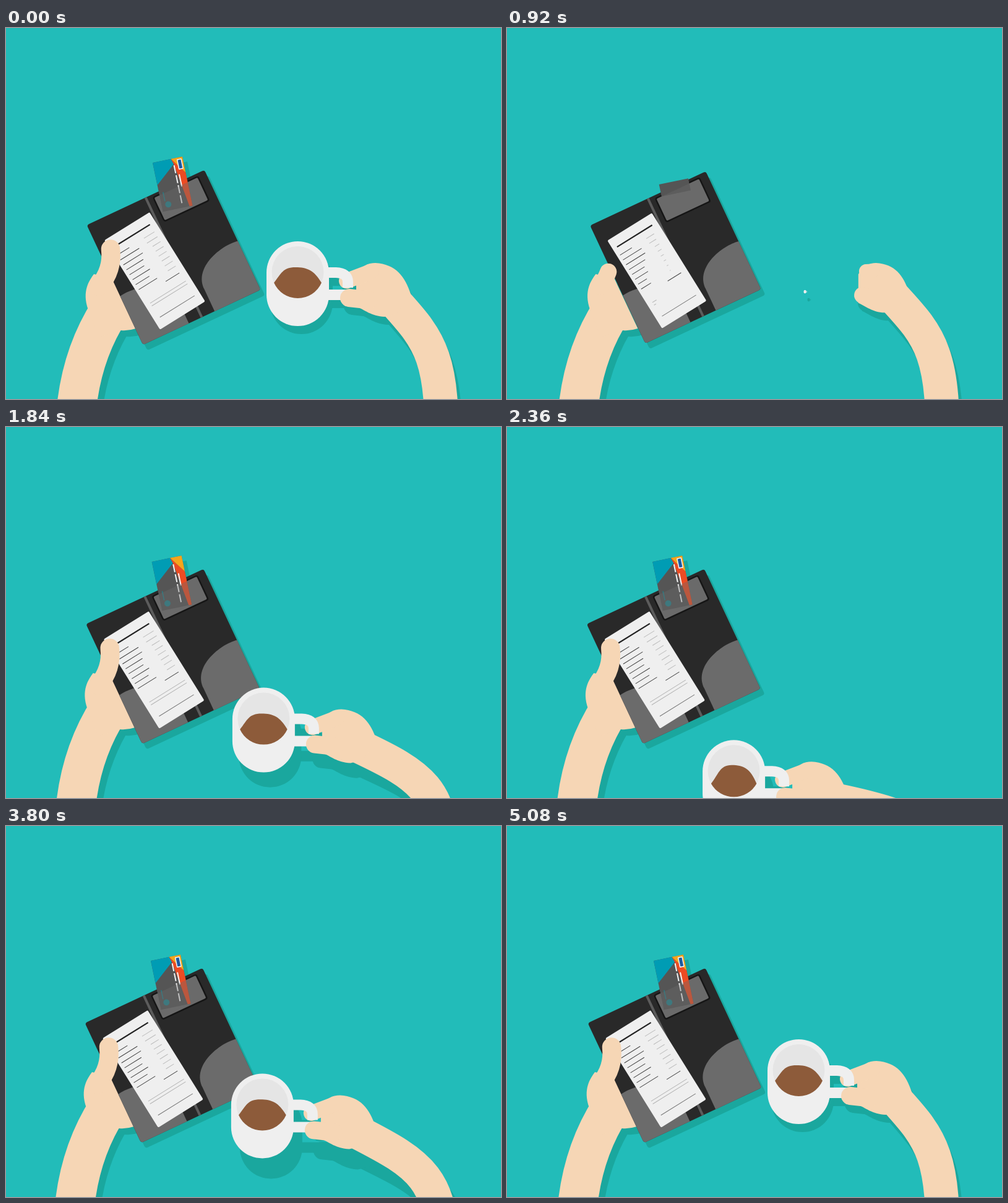
Write an HTML page with a canvas that moves like this. It is 800 by 600 pixels and loops after 5.12 s.

```html
<!DOCTYPE html>
<html lang="en">
<head>
<meta charset="utf-8">
<title>Paying the bill</title>
<style>
html, body { margin: 0; width: 100%; height: 100%; overflow: hidden; background: #22bcb9; }
canvas { display: block; }
</style>
</head>
<body>
<canvas id="stage" width="800" height="600"></canvas>
<script>
const ctx = document.getElementById('stage').getContext('2d');
const LOOP = 5120;
const TEAL = '#22bcb9', SHADOW = '#1aa79e', SKIN = '#f6d6b5', CHINA = '#efefef';
const DARK = '#292929', GREY = '#6b6b6b';
let tint = null; // when set, every shape takes this colour

const clamp = x => Math.min(1, Math.max(0, x));
const lerp = (a, b, k) => a + (b - a) * k;
const span = (t, from, to) => clamp((t - from) / (to - from));
const ease = (t, from, to) => (1 - Math.cos(Math.PI * span(t, from, to))) / 2;
const easeOut = (t, from, to) => 1 - (1 - span(t, from, to)) ** 3;

function fill(path, color) {
  ctx.fillStyle = tint || color;
  ctx.fill(new Path2D(path));
}
function stroke(path, color, width, cap = 'butt') {
  ctx.strokeStyle = tint || color;
  ctx.lineWidth = width;
  ctx.lineCap = cap;
  ctx.stroke(new Path2D(path));
}
function box(x, y, w, h, r, color) {
  ctx.fillStyle = tint || color;
  ctx.beginPath();
  ctx.roundRect(x, y, w, h, r);
  ctx.fill();
}
function disc(x, y, r, color) {
  ctx.fillStyle = tint || color;
  ctx.beginPath();
  ctx.arc(x, y, r, 0, 2 * Math.PI);
  ctx.fill();
}
function group(x, y, degrees, draw) {
  ctx.save();
  ctx.translate(x, y);
  ctx.rotate(degrees * Math.PI / 180);
  draw();
  ctx.restore();
}
function scaled(x, y, sx, sy, draw) {
  if (!sx || !sy) return;
  ctx.save();
  ctx.translate(x, y);
  ctx.scale(sx, sy);
  ctx.translate(-x, -y);
  draw();
  ctx.restore();
}
function shadow(dx, dy, draw) {
  tint = SHADOW;
  group(dx, dy, 0, draw);
  tint = null;
}

function walletCover() {
  group(271, 371, -25.1, () => {
    box(-105, -107, 210, 214, 4, DARK);
    if (tint) return;
    const panel = () => fill('M105,20C78,15 22,28 23,68V107H101Q105,107 105,103Z', GREY);
    panel();
    scaled(0, 0, -1, 1, panel);
    box(-2, -107, 4, 214, 0, '#5c5c5c');
    box(10, -103, 82, 45, 4, '#151515');
    box(12.5, -100.5, 77, 40, 2, GREY);
  });
}

function card(t) {
  const grow = 1.1 * ease(t, 820, 1140) - .1 * ease(t, 1140, 1360);
  group(237, 218, -11.8, () => scaled(24, 45, 1, grow, () => {
    box(0, 0, 49, 81, 0, '#555');
    if (tint) return;
    ctx.globalAlpha = ease(t, 1000, 1160);
    fill('M0,0H30L33,9L0,37Z', '#009cb4');
    fill('M30,0L49,26V81H44L33,9Z', '#ec4b23');
    fill('M30,0H49V26Z', '#f6a51c');
    for (let y = 11; y < 70; y += 16.5) box(32, y, 2, 13, 0, '#f4f4f4');
    box(37.3, 27, 2, 20, 0, '#f4f4f4');
    box(6, 50, 1.5, 15, 0, '#23808a');
    disc(11, 71, 5, '#23808a');
    if (t > 2000) {
      box(39, 2.5, 8, 17, 1, '#f4f4f4');
      box(40.5, 4, 5, 14, 0, '#1c5aa0');
    }
    ctx.globalAlpha = 1;
  }));
}

function pocketFront() {
  ctx.globalAlpha = .38;
  group(271, 371, -25.1, () => box(12.5, -100.5, 77, 40, 2, GREY));
  ctx.globalAlpha = 1;
}

function receipt(t) {
  const line = (x, y, length, color, width = 1) =>
    box(x, y - width / 2, length, width, 0, color);
  group(159, 343.4, -31.9, () => {
    box(0, 0, 86, 170, 2, CHINA);
    line(8, 17.2, 68 * span(t, 720, 860), '#222', 2.2);
    [23, 36, 37, 32, 28, 33, 26, 35].forEach((length, i) => {
      line(5, 31.2 + 9.4 * i, length * span(t, 740 + 15 * i, 880 + 15 * i), '#444');
      const x = i < 2 ? 56 : 61;
      line(x, 31 + 9.3 * i, (76 - x) * span(t, 800 + 15 * i, 960 + 15 * i), '#bcbcbc');
    });
    line(49, 108.8, 26 * span(t, 800, 920), '#444');
    line(9, 125.4, 68 * span(t, 900, 1080), '#b4b4b4');
    line(9, 130.6, 68 * span(t, 910, 1100), '#b4b4b4');
    line(10.5, 153, 66 * span(t, 800, 920), '#777');
  });
}

const leftArm = rise =>
  stroke(`M168,${456 + rise}Q117,${535 + rise} 112,640`, SKIN, 64);
const leftPalm = () =>
  fill('M133,456C122,425 135,408 142,398L172,405L210,486Q198,490 186,489L150,500Z', SKIN);
function leftThumb(grip) {
  const along = (from, to) => lerp(from, to, grip);
  stroke(`M150,418Q${along(158, 173)},${along(405, 392)} ${along(162, 169)},${along(396, 357.5)}`,
    SKIN, along(27, 30.5), 'round');
}

function rightArm(hand, baseX) {
  const x = 626 + hand.x, y = 440 + hand.y;
  const cx = x + .75 * (702 - x), cy = y + .75 * (85 - .3 * (y - 440));
  stroke(`M${x},${y}C${cx},${cy} ${baseX + 7.5},${cy + 25} ${baseX},${Math.max(700, cy + 100)}`, SKIN, 55);
}
function rightHand(grip) {
  fill('M566,400C573,385 585,380 597,380C630,382 645,402 654,430L632,462L612,467C590,466 580,456 566,450Z', SKIN);
  stroke(`M590,394L${lerp(581, 550.5, grip)},${lerp(394, 409, grip)}`, SKIN, 25, 'round');
}
const rightThumb = grip =>
  stroke(`M586,440L${lerp(574, 554.5, grip)},436.5`, SKIN, 29, 'round');

function cup(size, insideSize, tilt) {
  scaled(482, 427, size, size, () => {
    stroke('M515,395.5H533Q552.5,396 552.5,411V420M515,431.5H553', CHINA, 17);
    box(421, 345, 101, 137, 50.5, CHINA);
    if (tint) return;
    scaled(471.5, 395, insideSize, insideSize, () => {
      disc(471.5, 395, 42, '#e5e5e5');
      const tip = 412 + 6 * tilt, top = 387 - 3 * tilt;
      const half = Math.sqrt(42 * 42 - (tip - 395) ** 2);
      const left = 471.5 - half, right = 471.5 + half;
      fill(`M${left},${tip}C${left + 12},${tip - 15} ${left + 14},${top} 468,${top}` +
        `C487,${top} 498,${top + 5} ${right},${tip}A42,42 0 0 1 ${left},${tip}Z`, '#8d5b3a');
    });
  });
}

function scene(t) {
  const rise = 300 * (1 - easeOut(t, 540, 880));
  const grip = ease(t, 890, 1120);
  const loose = 1 - grip;
  const drift = 2 * loose - 3 * (span(t, 300, 3800) - ease(t, 3900, 5080));
  const walletSize = easeOut(t, 660, 1010);
  const wallet = draw => scaled(271, 371, walletSize, walletSize, draw);

  // The cup goes down to be sipped and comes back along a wider arc.
  const sip = ease(t, 1080, 2850) - ease(t, 2830, 4340);
  const hand = {
    x: -110 * (ease(t, 1120, 2560) - ease(t, 2721, 4936)),
    y: 196 * sip + rise
  };
  const lift = ease(t, 1200, 2400) - ease(t, 4300, 5060);
  const dx = 6 + 8 * lift, dy = 13 + 20 * lift;
  const handSize = lerp(.92, 1, grip);

  const leftSide = () => {
    leftArm(rise);
    group(0, rise, 0, leftPalm);
  };
  const rightSide = () => {
    const part = draw => scaled(590, 380, handSize, handSize, () => draw(grip));
    part(rightHand);
    cup(ease(t, 880, 1200), ease(t, 940, 1240), clamp(sip) ** 3);
    part(rightThumb);
  };
  const armAt = (x, y) => rightArm(
    { x: hand.x - 4 * loose + x, y: hand.y - 8 * loose + y }, 702.5 + x);

  group(drift, 0, 0, () => {
    shadow(9, 10, leftSide);
    shadow(7, 9, () => wallet(walletCover));
    shadow(8, 8, () => wallet(() => card(t)));
  });
  shadow(0, 0, () => armAt(dx, dy));
  shadow(hand.x + dx, hand.y + dy, rightSide);

  group(drift, 0, 0, () => {
    leftSide();
    wallet(() => {
      walletCover();
      card(t);
      pocketFront();
      receipt(t);
    });
    group(0, rise, 0, () => leftThumb(grip));
  });
  armAt(0, 0);
  group(hand.x, hand.y, 0, rightSide);
}

function frame(now) {
  const t = now % LOOP;
  ctx.fillStyle = TEAL;
  ctx.fillRect(0, 0, 800, 600);
  if (t < 520) scene(LOOP);
  if (t < 760) {
    const radius = ms => .002 * Math.max(0, ms) ** 2;
    disc(400, 300, radius(t), '#f7f7f7');
    disc(400, 300, radius(t - 239), TEAL);
  }
  if (t >= 560) scene(t);
  requestAnimationFrame(frame);
}
requestAnimationFrame(frame);
</script>
</body>
</html>
```
